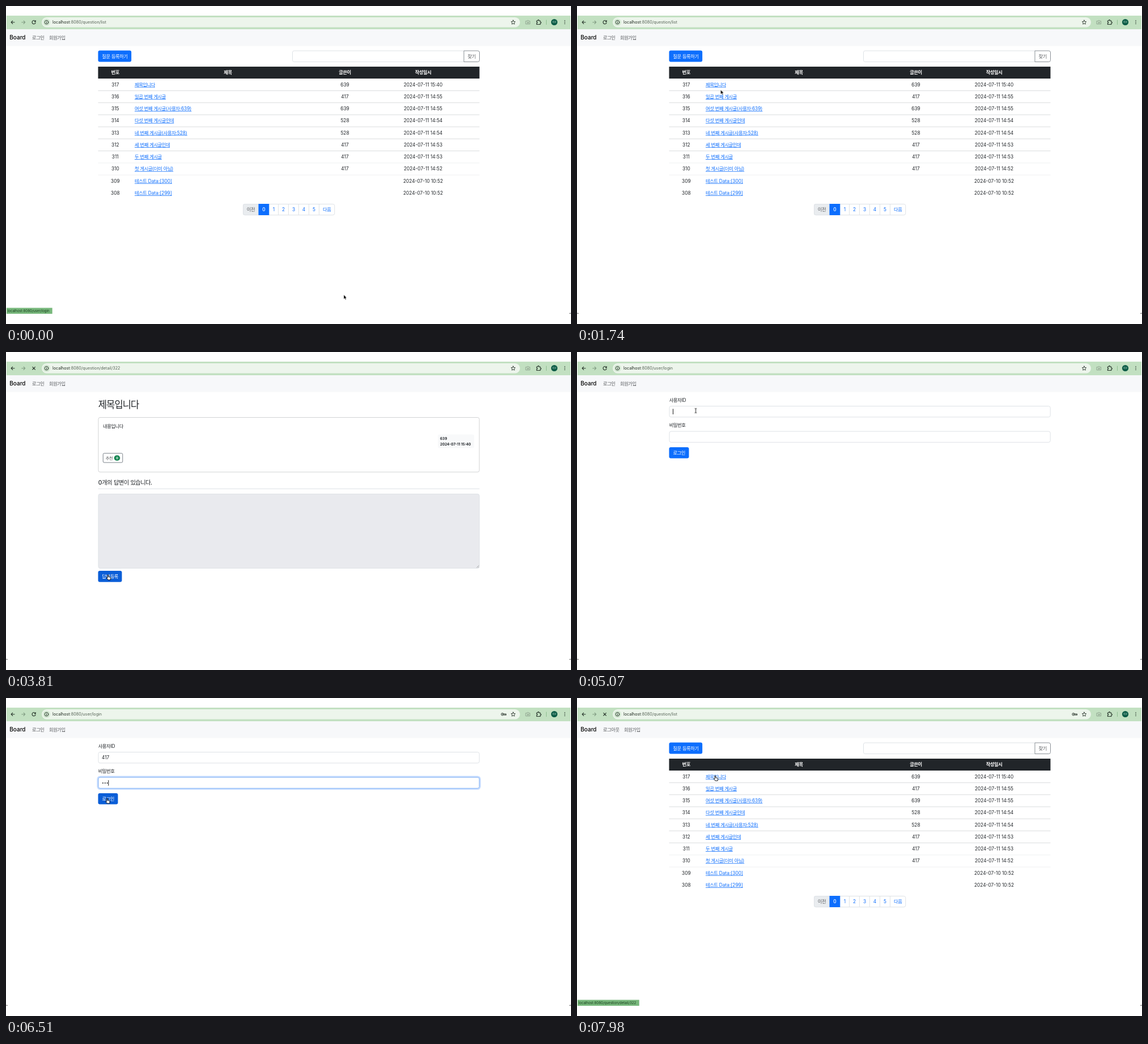
Recreate the animation shown at these times as an HTML page. Size 997 by 561 pixels, loop 8000 ms.

```html
<!DOCTYPE html>
<html lang="ko">
<head>
<meta charset="utf-8">
<title>Board</title>
<style>
html, body { margin: 0; width: 100%; height: 100%; overflow: hidden; background: #fff; }
svg { display: block; width: 100vw; height: 100vh; }
text { font: 8.3px Inter, 'Noto Sans CJK KR', 'Noto Sans CJK JP', sans-serif; fill: #212529; white-space: pre; }
.ko { letter-spacing: -.055em; }
.m { text-anchor: middle; }
.w { fill: #fff; }
.b { font-weight: 700; }
.md { font-weight: 500; }
.gray { fill: #595c5f; }
.link { fill: #0d6efd; }
.u { text-decoration: underline; }
.url { font-size: 7.2px; fill: #566356; }
.host { fill: #1c261c; }
.tip { font-size: 6.1px; fill: #173d1b; }
.btn { fill: #0d6efd; }
.line { fill: none; stroke: #dee2e6; }
.icon { fill: none; stroke: #26332a; stroke-width: 1.1; stroke-linecap: round; stroke-linejoin: round; }
.ring { fill: none; stroke: #0d6efd; stroke-opacity: .25; stroke-width: 2; }
.rim { fill: none; stroke: #86b7fe; }

.a { animation: 8s step-end infinite; }
.soft { animation: 8s linear infinite; }
.list { animation-name: list; }
.detail { animation-name: detail; }
.login { animation-name: login; }
.guest { animation-name: guest; }
.member { animation-name: member; }
.stop { animation-name: stop; }
.reload { animation-name: reload; }
.key { animation-name: key; }
.tip1 { animation-name: tip1; }
.tip2 { animation-name: tip2; }
.id-focus { animation-name: idFocus; }
.pw-focus { animation-name: pwFocus; }
.id-caret { animation-name: idCaret; }
.pw-caret { animation-name: pwCaret; }
.id-type { animation-name: idType; }
.pw-type { animation-name: pwType; }
.reply { animation-name: reply; }
.enter { animation-name: enter; }
.arrow { animation-name: arrow; }
.hand { animation-name: hand; }
.beam { animation-name: beam; }
.pointer { animation: move 8s cubic-bezier(.4, 0, .3, 1) infinite; }

@keyframes list { 0%, 84% { opacity: 1 } 26.25% { opacity: 0 } }
@keyframes detail { 0%, 48.375% { opacity: 0 } 26.25% { opacity: 1 } }
@keyframes login { 0%, 84% { opacity: 0 } 48.375% { opacity: 1 } }
@keyframes guest { 0% { opacity: 1 } 84% { opacity: 0 } }
@keyframes member { 0% { opacity: 0 } 84% { opacity: 1 } }
@keyframes stop {
  0%, 30.375%, 49.125%, 86.25% { opacity: 0 }
  24.75%, 45.75%, 82.5%, 98.625% { opacity: 1 }
}
@keyframes reload {
  0%, 30.375%, 49.125%, 86.25% { opacity: 1 }
  24.75%, 45.75%, 82.5%, 98.625% { opacity: 0 }
}
@keyframes key { 0% { opacity: 0 } 66% { opacity: 1 } }
@keyframes tip1 { 0%, 6.5% { opacity: 1 } 8.5%, 100% { opacity: 0 } }
@keyframes tip2 {
  0%, 23.3%, 29%, 95% { opacity: 0 }
  23.9%, 26.25%, 95.8%, 100% { opacity: 1 }
  26.6% { opacity: .85 }
}
@keyframes idFocus { 0%, 63.4%, 73%, 100% { opacity: 0 } 65.25%, 71.25% { opacity: 1 } }
@keyframes pwFocus { 0%, 71.25% { opacity: 0 } 73%, 100% { opacity: 1 } }
@keyframes idCaret { 0%, 71.25% { opacity: 0 } 63.375% { opacity: 1 } }
@keyframes pwCaret { 0% { opacity: 0 } 71.25% { opacity: 1 } }
@keyframes idType {
  0% { transform: none }
  66% { transform: translateX(5.3px) }
  67.5% { transform: translateX(8.7px) }
  69% { transform: translateX(13.4px) }
}
@keyframes pwType {
  0% { transform: none }
  73.875% { transform: translateX(3.7px) }
  75% { transform: translateX(7.5px) }
  76.125% { transform: translateX(11.3px) }
}
@keyframes reply { 0% { fill: #0d6efd } 42.75% { fill: #0b5ed7 } }
@keyframes enter { 0%, 56.25% { fill: #0d6efd } 54.75%, 80.25% { fill: #0b5ed7 } }
@keyframes arrow {
  0%, 30.375%, 48.375%, 56.25%, 78.4%, 84% { opacity: 1 }
  23%, 42.75%, 54.75%, 59.25%, 80.25%, 94.125% { opacity: 0 }
}
@keyframes hand {
  0%, 30.375%, 48.375%, 56.25%, 84% { opacity: 0 }
  23%, 42.75%, 54.75%, 80.25%, 94.125% { opacity: 1 }
}
@keyframes beam { 0%, 66%, 78.4% { opacity: 0 } 59.25%, 76.875% { opacity: 1 } }
@keyframes move {
  0%, 6% { transform: translate(596px, 509.5px) }
  21.5%, 21.9% { transform: translate(253.5px, 148px) }
  23.25%, 35.625% { transform: translate(253px, 142.5px) }
  43.5%, 48.75% { transform: translate(180px, 393px) }
  55%, 55.875% { transform: translate(185px, 173px) }
  60.375%, 77% { transform: translate(209.5px, 103.5px) }
  80.6%, 86% { transform: translate(178.5px, 177px) }
  94.2%, 100% { transform: translate(244px, 137px) }
}
</style>
</head>
<body>
<svg viewBox="0 0 997 561" preserveAspectRatio="none">
  <!-- browser bar -->
  <rect x="1" y="17" width="995" height="24" fill="#c2e0c1"/>
  <rect x="63" y="20" width="844" height="17.5" rx="8.75" fill="#edf5ec"/>
  <circle cx="71.5" cy="28.7" r="6.3" fill="#d3e8d2"/>
  <g class="icon">
    <path d="M15 28.7H9.2m2.5-2.6-2.6 2.6 2.6 2.6"/>
    <path d="M27.8 28.7h5.8m-2.5-2.6 2.6 2.6-2.6 2.6" stroke="#7f9a80"/>
    <path class="a reload" d="M51.9 27.2a3.1 3.1 0 1 0 .2 2.3M52.2 25.6v2h-2"/>
    <path class="a stop" d="m46.8 26.4 4.6 4.6m0-4.6-4.6 4.6"/>
    <circle cx="71.5" cy="28.7" r="3.3" stroke-width=".9"/>
    <path d="M71.5 28.5v1.8m0-3.4v.1" stroke-width=".9"/>
    <path d="m895 25 1.1 2.4 2.6.3-1.9 1.8.5 2.6-2.3-1.3-2.3 1.3.5-2.6-1.9-1.8 2.6-.3z" stroke-width=".9"/>
    <path d="M917.5 26.6h1.7l.7-1h2.2l.7 1h1.7v5.2h-7z" stroke="#8b9d8b" stroke-width=".9"/>
    <circle cx="921" cy="29.2" r="1.2" stroke="#8b9d8b" stroke-width=".9"/>
    <path d="M936.4 26h2.2q-.3-1.6.9-1.6t.9 1.6h2.4v2.3q1.5-.2 1.5 1t-1.5 1v2.2h-6.4v-2.2q1.4 0 1.4-1t-1.4-1z"/>
    <g class="a key" stroke-width=".9">
      <circle cx="876" cy="28.7" r="2.2"/><circle cx="876" cy="28.7" r=".4"/>
      <path d="M878.3 28h4.2v2.2h-1.4v-1h-1v1h-1.4"/>
    </g>
  </g>
  <rect x="953" y="24.5" width="1" height="8.5" fill="#8fbf92"/>
  <circle cx="967.5" cy="28.5" r="5.6" fill="#0a5a45"/>
  <text class="m" x="967.3" y="30" style="font-size:4px;fill:#b9d8c8">회원</text>
  <g fill="#26332a"><circle cx="986" cy="25.7" r=".8"/><circle cx="986" cy="28.5" r=".8"/><circle cx="986" cy="31.3" r=".8"/></g>

  <!-- site header -->
  <rect x="1" y="41" width="995" height="29.5" fill="#f7f8fa"/>
  <text class="md" x="6.3" y="59.2" style="font-size:10px;fill:#000">Board</text>
  <g class="a guest"><text class="gray" x="46" y="58.5">로그인</text><text class="gray" x="76" y="58.5">회원가입</text></g>
  <g class="a member"><text class="gray" x="46" y="58.5">로그아웃</text><text class="gray" x="83" y="58.5">회원가입</text></g>

  <g class="a list">
    <text class="url" x="82" y="31.3"><tspan class="host">localhost</tspan>:8080/question/list</text>
    <rect class="btn" x="162.5" y="78.5" width="58.7" height="20" rx="3"/>
    <text class="m w md" x="192" y="91.5">질문 등록하기</text>
    <path class="line" d="M808 79H508.500q-3 0-3 3v13.500q0 3 3 3H808"/>
    <path d="M808 79h24.500q3 0 3 3v13.500q0 3-3 3H808z" fill="none" stroke="#7d858c" stroke-width=".9"/>
    <text class="m gray" x="821.7" y="91.7">찾기</text>
    <rect x="162.500" y="107" width="673" height="21" fill="#212529"/>
    <g id="rows"></g>
    <g id="pager"></g>
  </g>

  <g class="a detail">
    <text class="url" x="82" y="31.3"><tspan class="host">localhost</tspan>:8080/question/detail/322</text>
    <text class="md" x="162.700" y="98.700" style="font-size:16.6px">제목입니다</text>
    <rect x="163" y="115.500" width="672.200" height="96.300" rx="3" fill="#fff" stroke="#d2d3d4"/>
    <text x="171" y="133.500">내용입니다</text>
    <rect x="762" y="145.500" width="64" height="24" rx="3" fill="#f8f9fa"/>
    <text class="b" x="766" y="154.500" style="font-size:6.3px">639</text>
    <text class="b" x="766" y="164.800" style="font-size:6.3px">2024-07-11 15:40</text>
    <rect x="171.300" y="178.700" width="34.500" height="16.300" rx="2" fill="#fff" stroke="#6c757d" stroke-width=".9"/>
    <text class="gray" x="175.800" y="189.600" style="font-size:7.3px">추천</text>
    <rect x="190.700" y="182.300" width="10.600" height="9.400" rx="4.700" fill="#198754"/>
    <text class="m w b" x="196" y="189" style="font-size:5.4px">0</text>
    <text class="md" x="162.700" y="234.200" style="font-size:10.3px">0개의 답변이 있습니다.</text>
    <path class="line" d="M162.500 241.300h673"/>
    <rect x="163" y="250.500" width="672.200" height="131" rx="3" fill="#e9eaee" stroke="#dee2e6"/>
    <path d="m830.500 380.500 4-4m-1.500 4 1.500-1.500" stroke="#777" stroke-width=".6"/>
    <rect class="a reply" x="162.500" y="386" width="42" height="19.700" rx="3"/>
    <text class="m w md" x="183.700" y="398.900">답변등록</text>
  </g>

  <g class="a login">
    <text class="url" x="82" y="31.3"><tspan class="host">localhost</tspan>:8080/user/login</text>
    <text x="162.700" y="88">사용자ID</text>
    <text x="162.700" y="132.300">비밀번호</text>
    <rect class="line" x="163" y="95.500" width="672.200" height="19.300" rx="3"/>
    <rect class="line" x="163" y="140" width="672.200" height="19.300" rx="3"/>
    <g class="soft id-focus">
      <rect class="ring" x="161.500" y="94" width="675.200" height="22.300" rx="4.500"/>
      <rect class="rim" x="163" y="95.500" width="672.200" height="19.300" rx="3"/>
    </g>
    <g class="soft pw-focus">
      <rect class="ring" x="161.500" y="138.500" width="675.200" height="22.300" rx="4.500"/>
      <rect class="rim" x="163" y="140" width="672.200" height="19.300" rx="3"/>
    </g>
    <text x="169" y="108.200">417</text>
    <g class="a id-type">
      <rect x="169" y="98" width="18" height="14" fill="#fff"/>
      <rect class="a id-caret" x="169" y="100.300" width=".9" height="9.700"/>
    </g>
    <g fill="#212529"><circle cx="171" cy="150" r="1"/><circle cx="174.800" cy="150" r="1"/><circle cx="178.600" cy="150" r="1"/></g>
    <g class="a pw-type">
      <rect x="169" y="143" width="18" height="13" fill="#fff"/>
      <rect class="a pw-caret" x="169" y="145" width=".9" height="9.700"/>
    </g>
    <rect class="a enter" x="162.500" y="168" width="35" height="19.600" rx="3"/>
    <text class="m w md" x="180.200" y="180.900">로그인</text>
  </g>

  <!-- window corners and status bubbles -->
  <path d="M1 540.500q.3 2 2 2.500H1zM996 540.500q-.3 2-2 2.500h2z"/>
  <g class="soft tip1">
    <path d="M1 532.500h80.700V543H1z" fill="#78b87c"/>
    <text class="tip" x="2.800" y="540">localhost:8080/user/login</text>
  </g>
  <g class="soft tip2">
    <path d="M1 532.500h108.800V543H1z" fill="#78b87c"/>
    <text class="tip" x="2.800" y="540">localhost:8080/question/detail/322</text>
  </g>

  <g class="pointer">
    <path class="a arrow" d="M0 0v7.600l1.800-1.600 1.200 2.700 1.300-.6-1.200-2.600h2.300z" stroke="#fff" stroke-width=".5"/>
    <path class="a hand" d="M-.8.8a.8.8 0 0 1 1.600 0v2.800l2.800.6q1.400.4 1.200 1.800l-.6 3H0l-2.600-3.400q0-1.200 1.800-.2z" fill="#fff" stroke="#000" stroke-width=".9"/>
    <path class="a beam" d="M-1.700-4Q0-4 0-3v6q0 1-1.700 1M1.700-4Q0-4 0-3m0 6q0 1 1.700 1" fill="none" stroke="#000" stroke-width=".9"/>
  </g>
</svg>
<script>
const $ = id => document.getElementById(id);
const text = (x, y, s, cls) => `<text class="${cls}" x="${x}" y="${y}">${s}</text>`;
const cols = [192.8, 391.5, 598, 736];

const posts = [
  ['제목입니다', '639', '11 15:40'],
  ['일곱 번째 게시글', '417', '11 14:55'],
  ['여섯 번째 게시글(사용자:639)', '639', '11 14:55'],
  ['다섯 번째 게시글인데', '528', '11 14:54'],
  ['네 번째 게시글(사용자:528)', '528', '11 14:54'],
  ['세 번째 게시글인데', '417', '11 14:53'],
  ['두 번째 게시글', '417', '11 14:53'],
  ['첫 게시글(더미 아님)', '417', '11 14:52'],
  ['테스트 Data:[300]', '', '10 10:52'],
  ['테스트 Data:[299]', '', '10 10:52']
];
const head = ['번호', '제목', '글쓴이', '작성일시']
  .map((s, i) => text(cols[i], 120.4, s, 'm w b')).join('');
$('rows').innerHTML = head + posts.map(([title, user, date], i) => {
  const y = 141.7 + 21.25 * i;
  const shade = i < 6 ? '#dadcde' : i < 8 ? '#eff0f1' : 'none';
  return text(cols[0], y, 317 - i, 'm') + text(227, y, title, 'link u') +
    text(cols[2], y, user, 'm') + text(cols[3], y, '2024-07-' + date, 'm') +
    `<path d="M162.5 ${y + 7.7}h673" stroke="${shade}"/>`;
}).join('');

const labels = ['이전', 0, 1, 2, 3, 4, 5, '다음'];
const edges = [418.5, 445.5, 464.3, 480.5, 498.4, 516.5, 534.5, 552.5, 579.8];
$('pager').innerHTML =
  '<rect x="418" y="349" width="28" height="20" rx="3" fill="#e9ecef"/>' +
  '<rect class="line" x="418.5" y="349.5" width="161.3" height="19.3" rx="3"/>' +
  edges.slice(3, 8).map(x => `<path class="line" d="M${x} 349.5v19.3"/>`).join('') +
  '<rect class="btn" x="445.5" y="349" width="18.8" height="20"/>' +
  labels.map((s, i) => text((edges[i] + edges[i + 1]) / 2, 362.2, s,
    'm ' + (['gray', 'w md'][i] || 'link'))).join('');

// Hangul runs are set a little tighter than Latin.
document.querySelectorAll('text').forEach(el => {
  el.innerHTML = el.innerHTML.replace(/[가-힣]+/g, '<tspan class="ko">$&</tspan>');
});
</script>
</body>
</html>
```
